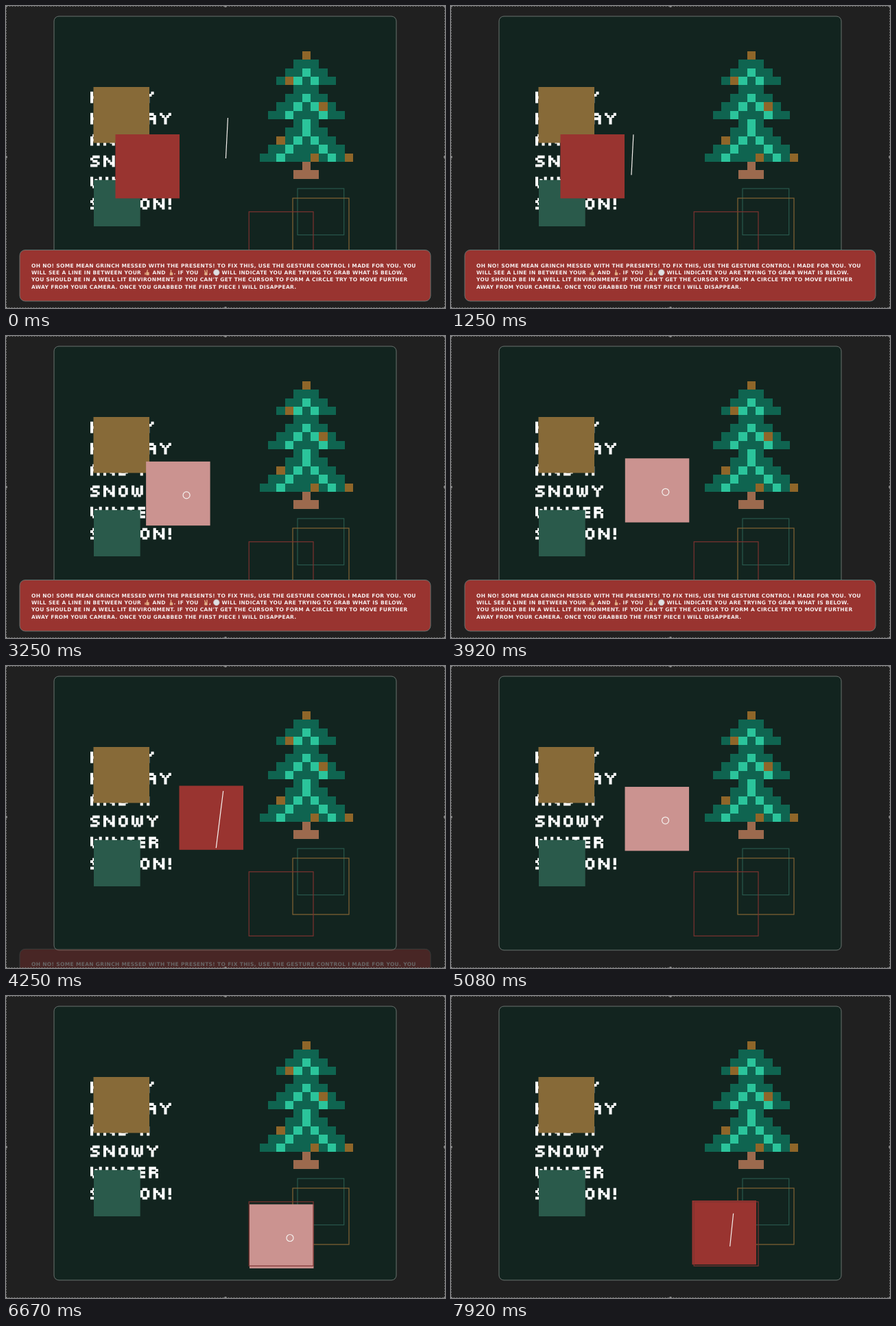
Recreate the animation shown at these times as an HTML page. Size 640 by 440 pixels, loop 8 s.

```html
<!DOCTYPE html>
<html lang="en">
<head>
<meta charset="utf-8">
<title>Holiday gesture card</title>
<style>
  html, body { margin: 0; width: 100%; height: 100%; overflow: hidden; background: #202020; }
  svg { display: block; width: 640px; height: 440px; }
  .note text { font: bold 7.5px "DejaVu Sans", sans-serif; letter-spacing: .33px; fill: #f7eeee; }
  .title path { fill: none; stroke: #fff; stroke-width: 1.3; stroke-linecap: square; }
  .slot { fill: none; stroke-width: 1.2; }
  .skin { fill: #e2ae84; stroke: #e2ae84; stroke-width: 1.4; stroke-linecap: round; stroke-linejoin: round; }
</style>
</head>
<body>
<svg viewBox="0 0 640 440">
  <rect width="640" height="440" fill="#202020"/>
  <rect x="70" y="15" width="499" height="399" rx="7" fill="#12241f" stroke="#68736f"/>
  <g id="title" class="title" role="img" aria-label="Happy holiday and a snowy winter season!"></g>
  <g id="tree" shape-rendering="crispEdges"></g>
  <rect class="slot" x="425" y="266" width="67.7" height="67.5" stroke="#28584c"/>
  <rect class="slot" x="418" y="280" width="82" height="82" stroke="#846434"/>
  <rect x="127.5" y="118" width="81.5" height="81.5" fill="#876a38"/>
  <rect x="128" y="253.5" width="67.7" height="67.5" fill="#2a5a4b"/>
  <rect id="piece" width="93.5" height="93.3"/>
  <rect class="slot" x="354.2" y="299.8" width="93.8" height="93.5" stroke="#7d3230"/>

  <g id="note" class="note">
    <rect x="20" y="355.5" width="599" height="74.5" rx="8" fill="#993430" stroke="#68736f"/>
    <text x="37" y="380.6">OH NO! SOME MEAN GRINCH MESSED WITH THE PRESENTS! TO FIX THIS, USE THE GESTURE CONTROL I MADE FOR YOU. YOU</text>
    <text y="391"><tspan x="37">WILL SEE A LINE IN BETWEEN YOUR</tspan><tspan x="213.5">AND</tspan><tspan x="244.5">. IF YOU</tspan><tspan x="296">,</tspan><tspan x="314.5">WILL INDICATE YOU ARE TRYING TO GRAB WHAT IS BELOW.</tspan></text>
    <text x="37" y="401.4">YOU SHOULD BE IN A WELL LIT ENVIRONMENT. IF YOU CAN'T GET THE CURSOR TO FORM A CIRCLE TRY TO MOVE FURTHER</text>
    <text x="37" y="411.6">AWAY FROM YOUR CAMERA. ONCE YOU GRABBED THE FIRST PIECE I WILL DISAPPEAR.</text>
    <path class="skin" d="M203 389v2M205 388.5h3v3h-3zM205.5 388l.8-3"/>
    <path class="skin" d="M239.5 389h3v2.5h-3zM240.5 388v-3"/>
    <path class="skin" d="M290 389h3v2.5h-3zM290.5 388l-.8-2.5M293 388v-3"/>
    <circle cx="306.8" cy="388.2" r="4.3" fill="#dfe0e2" stroke="#b9babd" stroke-width=".8"/>
  </g>

  <g fill="none" stroke="#f5f1ee" stroke-width="1.2">
    <path id="line"/>
    <circle id="ring" r="5"/>
  </g>

  <rect x=".5" y=".5" width="639" height="439" fill="none" stroke="#747474" stroke-dasharray="2 2"/>
  <g id="handles" fill="#8c8c8c"></g>
</svg>
<script>
const $ = id => document.getElementById(id);
const LOOP = 8000;

function add(parent, tag, attrs) {
  const el = document.createElementNS('http://www.w3.org/2000/svg', tag);
  for (const key in attrs) el.setAttribute(key, attrs[key]);
  return parent.appendChild(el);
}

// Strokes shared by the block letters; e is the last column.
const strokes = e => ({
  left: 'M0 0V4', leftLeg: 'M0 1V4', leftBow: 'M0 1V3', leftDot: 'M0 1h0',
  right: `M${e} 0V4`, rightLeg: `M${e} 1V4`, rightBow: `M${e} 1V3`,
  upDot: `M${e} 1h0`, lowDot: `M${e} 3h0`, foot: `M${e} 3V4`,
  top: `M1 0H${e - 1}`, mid: `M1 2H${e - 1}`, bottom: `M1 4H${e - 1}`,
  roof: `M0 0H${e}`, bar: `M0 2H${e}`, floor: `M0 4H${e}`,
  cap: `M1 0H${e}`, tail: `M0 4H${e - 1}`,
  stem: `M${e / 2} 0V4`, mark: 'M0 0V2M0 4h0',
  slope: 'M1 1h0M2 2h0M3 3h0',
  fork: 'M0 0h0M4 0h0M1 1h0M3 1h0M2 2V4',
  waves: 'M0 0V3M4 0V3M2 1V3M1 4h0M3 4h0'
});
const LETTERS = {
  A: [4, 'leftLeg rightLeg top mid'],
  D: [4, 'left top bottom rightBow'],
  E: [3, 'left roof bar floor'],
  H: [4, 'left right mid'],
  I: [1, 'left'],
  L: [3, 'left floor'],
  N: [5, 'left right slope'],
  O: [4, 'leftBow rightBow top bottom'],
  P: [4, 'left top upDot mid'],
  R: [4, 'left top upDot mid foot'],
  S: [4, 'cap leftDot mid lowDot tail'],
  T: [3, 'roof stem'],
  W: [5, 'waves'],
  Y: [5, 'fork'],
  '!': [1, 'mark'],
  ' ': [2, '']
};

'HAPPY/HOLIDAY/AND A/SNOWY/WINTER/SEASON!'.split('/').forEach((word, row) => {
  const g = add($('title'), 'g', { transform: `translate(123 ${125 + row * 31}) scale(3.16)` });
  let x = 0.65;
  for (const ch of word) {
    const [width, names] = LETTERS[ch];
    const shape = strokes(width - 1);
    add(g, 'path', { d: names.split(' ').map(n => shape[n] || '').join(''), transform: `translate(${x} .6)` });
    x += width + 2;
  }
});

// Tree: columns count from the trunk, each tier widens by one cell per row.
const CELL = 12.4;
function block(from, to, row, fill) {
  add($('tree'), 'rect', {
    x: 431.6 + from * CELL, y: 65.8 + row * CELL,
    width: (to - from + 1) * CELL, height: CELL, fill
  });
}
const DARK = '#0f6450', LIGHT = '#2bc49b', GOLD = '#8f6629', TRUNK = '#9c6a4e';
let row = 1;
for (const size of [3, 4, 5]) {
  for (let reach = 1; reach <= size; reach++, row++) {
    block(-reach, reach, row, DARK);
    const branch = Math.max(0, reach - 2);
    if (reach > 1 || size === 5) [-branch, branch].forEach(col => block(col, col, row, LIGHT));
  }
}
[[0, 0], [-2, 3], [2, 6], [-3, 10], [1, 12], [5, 12]].forEach(([col, r]) => block(col, col, r, GOLD));
block(0, 0, 13, TRUNK);
block(-1, 1, 14, TRUNK);

for (const x of [0, 320, 640])
  for (const y of [0, 220, 440])
    if (x !== 320 || y !== 220) add($('handles'), 'circle', { cx: x, cy: y, r: 2 });

// Where the hand passes: time, x, y.
const PATH = [
  [0, 322, 192.5], [2250, 218.5, 236], [2650, 218.5, 236], [3920, 312.8, 227.3],
  [4090, 311.5, 223.5], [5060, 311.5, 224], [5670, 341.5, 254],
  [6670, 414, 352.5], [7260, 410.5, 347], [LOOP, 409, 340]
];
// Fingers apart: start, end, half of the line between them.
const OPEN = [[-Infinity, 2250, 1.5, -29.5], [4090, 4980, 5.2, -41.5], [7260, Infinity, 2.5, -24]];
const GRABS = [[2650, 4090], [5060, 7260]];
const GRIP = [59, 49];

const clamp = (v, lo, hi) => Math.min(hi, Math.max(lo, v));
const spanAt = (spans, t) => spans.find(([from, to]) => t >= from && t < to);

function handAt(t) {
  const next = Math.max(1, PATH.findIndex(point => point[0] > t));
  const [t0, x0, y0] = PATH[next - 1], [t1, x1, y1] = PATH[next];
  const k = (t - t0) / (t1 - t0);
  return [x0 + (x1 - x0) * k, y0 + (y1 - y0) * k];
}

// The piece follows the hand during a grab and rests where it was let go.
function pieceAt(t) {
  const [from, to] = GRABS.findLast(grab => t >= grab[0]) || GRABS[0];
  return handAt(clamp(t, from, to)).map((v, i) => v - GRIP[i]);
}

function draw(now) {
  const t = now % LOOP;
  const [x, y] = handAt(t);
  const open = spanAt(OPEN, t);

  $('piece').setAttribute('transform', `translate(${pieceAt(t)})`);
  $('piece').setAttribute('fill', spanAt(GRABS, t) ? '#cb9390' : '#993430');
  $('ring').setAttribute('transform', `translate(${x} ${y})`);
  $('ring').setAttribute('visibility', open ? 'hidden' : 'visible');

  let d = '';
  if (open) {
    const [from, to, dx, dy] = open;
    const k = clamp(Math.min(t - from, to - t) / 160, 0, 1);
    d = `M${x + dx * k} ${y + dy * k}L${x - dx * k} ${y - dy * k}`;
  }
  $('line').setAttribute('d', d);

  const leave = 1 - (1 - clamp((t - 4050) / 500, 0, 1)) ** 2.15;
  $('note').setAttribute('transform', `translate(0 ${leave * 85})`);
  $('note').setAttribute('opacity', 1 - leave);
}

const start = performance.now();
function tick() {
  draw(performance.now() - start);
  requestAnimationFrame(tick);
}
tick();
</script>
</body>
</html>
```
